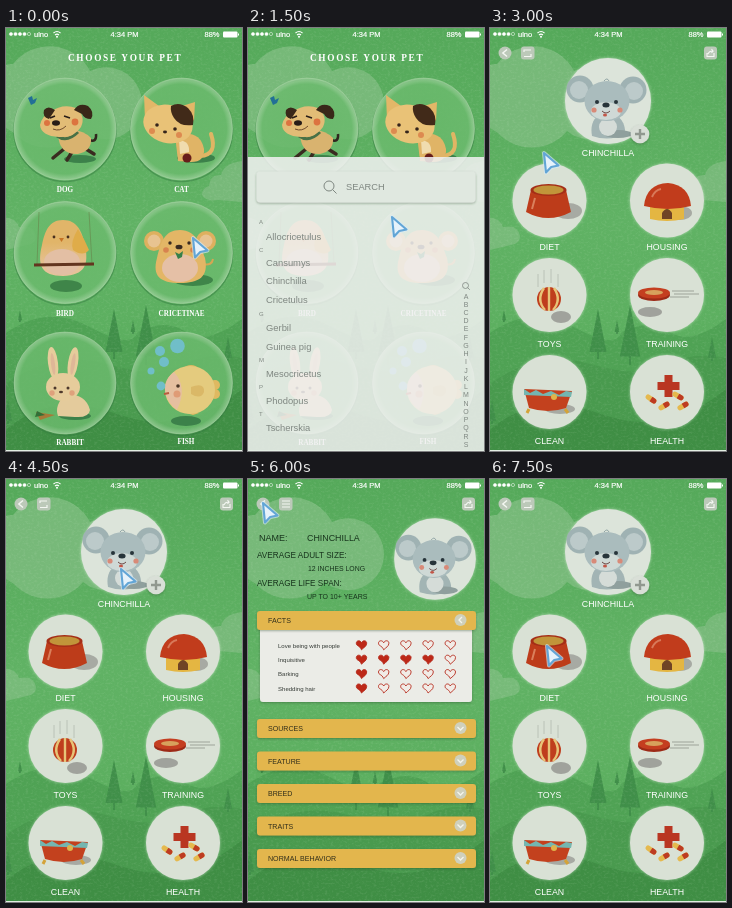
An HTML page that plays this animation: 236 by 423 pixels, repeating every 8 s.

```html
<!DOCTYPE html>
<html lang="en">
<head>
<meta charset="utf-8">
<title>Choose your pet</title>
<style>
  html, body { margin: 0; width: 100%; height: 100%; overflow: hidden; background: #56a95c; }
  svg { display: block; width: 236px; height: 423px; font-family: "Liberation Sans", Arial, sans-serif; }
  .slab { font: bold 9.3px "Liberation Serif", serif; letter-spacing: 1.65px; }
  .tag { font: bold 7.2px "Liberation Serif", serif; }
  .mid { text-anchor: middle; }
  .w { fill: #fff; }
</style>
</head>
<body>
<svg viewBox="0 0 236 423" xmlns="http://www.w3.org/2000/svg">
<defs>
  <linearGradient id="sky" x2="0" y2="1">
    <stop offset="0" stop-color="#55a95a"/><stop offset=".45" stop-color="#60b264"/><stop offset="1" stop-color="#58ac5b"/>
  </linearGradient>
  <radialGradient id="glass">
    <stop offset="0" stop-color="#68b86a" stop-opacity=".88"/><stop offset=".88" stop-color="#6bba6d" stop-opacity=".85"/>
    <stop offset="1" stop-color="#9bcf9a" stop-opacity=".85"/>
  </radialGradient>
  <linearGradient id="egg" x2="0" y2="1">
    <stop offset=".4" stop-color="#e1b569"/><stop offset=".85" stop-color="#e6c299"/>
  </linearGradient>
  <filter id="grain" x="0" y="0" width="100%" height="100%">
    <feTurbulence type="fractalNoise" baseFrequency=".35 .5" numOctaves="2" seed="4"/>
    <feColorMatrix values="0 0 0 0 .95  0 0 0 0 1  0 0 0 0 .9  3 0 0 0 -1.4"/>
  </filter>
  <filter id="shade" x="-20%" y="-20%" width="140%" height="150%">
    <feDropShadow dx="0" dy="1" stdDeviation="1" flood-color="#23452a" flood-opacity=".4"/>
  </filter>
  <filter id="halo" x="-20%" y="-20%" width="140%" height="140%">
    <feDropShadow dx="0" dy="0" stdDeviation="1.5" flood-color="#e4f3e2" flood-opacity=".6"/>
  </filter>
  <path id="heart" d="M0 4.8C-2-.1-5.2 1.4-5.2-1.8C-5.2-4.7-1.3-5.2 0-2.2C1.3-5.2 5.2-4.7 5.2-1.8C5.2 1.4 2 2.6 0 4.8Z" stroke="#b62c1d" stroke-width=".9"/>
  <path id="arrow" d="M1 1L3 20.5L8.2 15L15.5 13.5Z" stroke-linejoin="round"/>
  <g id="mouse">
    <circle r="43" fill="#dce4da" filter="url(#halo)"/>
    <path d="M-16 35C-19 18-9 12 0 12S18 20 17 33Q2 41-16 35Z" fill="#a2b4b4"/>
    <ellipse cx="10" cy="33" rx="14" ry="4" fill="#8f9f9d"/>
    <ellipse cx="0" cy="26" rx="9" ry="9" fill="#d5dcd8"/>
    <g fill="#9fb2b3"><circle cx="-28" cy="-12" r="13.5"/><circle cx="25" cy="-11" r="13.5"/></g>
    <g fill="#bccaca"><circle cx="-29" cy="-11" r="9"/><circle cx="26" cy="-10" r="9"/></g>
    <ellipse cx="-1" cy="0" rx="22.5" ry="20" fill="#aabcbd"/>
    <ellipse cx="-2" cy="10" rx="15" ry="9" fill="#cfd9d6"/>
    <path d="M-4-20Q-1-24 1-20" stroke="#8fa3a4" fill="none"/>
    <g fill="#27343a"><circle cx="-11" cy="1" r="2"/><circle cx="8" cy="1" r="2"/><ellipse cx="-2" cy="4" rx="3.6" ry="2.5"/></g>
    <path d="M-6 10Q-2 14 2 10" fill="none" stroke="#6d4b48"/>
    <g fill="#d88a78"><circle cx="-14" cy="9" r="2.6"/><circle cx="12" cy="9" r="2.6"/></g>
    <ellipse cx="-3" cy="14" rx="2" ry="1.5" fill="#c25648"/>
  </g>
</defs>

<g id="land">
  <rect width="236" height="423" fill="url(#sky)"/>
  <g fill="#7fbd80">
    <path d="M0 37A32 32 0 0 1 7 36A46 46 0 0 1 84 43A36 36 0 1 1 77 103A46 46 0 0 1 8 105L0 100Z" opacity=".8"/>
    <path d="M0 190Q10 190 13 199Q28 196 30 208Q30 216 21 217L0 222Z" opacity=".75"/>
    <path d="M236 133Q218 135 215 147Q204 146 203 158Q196 160 196 167Q200 174 212 172L236 174Z" opacity=".75"/>
  </g>
  <path d="M0 305Q42 276 84 299T132 304Q160 290 180 304T236 291V423H0Z" fill="#4fa254"/>
  <path d="M0 356Q48 321 100 336T177 337T236 330V423H0Z" fill="#499a4e"/>
  <path d="M0 402Q45 362 111 386T236 361V423H0Z" fill="#3f8e44"/>
  <g id="trees" fill="#408f49"></g>
  <rect width="236" height="423" filter="url(#grain)" opacity=".08"/>
</g>

<g id="choose">
  <text class="slab w" x="62" y="33">CHOOSE YOUR PET</text>
  <g id="discs"></g>
  <g id="dog">
    <ellipse cx="74" cy="131" rx="16" ry="4" fill="#3c814a"/>
    <path d="M22 70l4-2 1 4 4-2-2 5-4 2z" fill="#226f96"/>
    <path d="M83 112Q91 115 90 106" fill="none" stroke="#30261e" stroke-width="2.5"/>
    <path d="M58 121L47 130M66 124L61 132M80 121L88 126" stroke="#3a2b20" stroke-width="3.5" stroke-linecap="round"/>
    <path d="M52 106Q72 97 85 110Q86 123 72 126Q53 127 52 106Z" fill="#d9b36f"/>
    <path d="M51 108Q61 115 72 104" fill="none" stroke="#487146" stroke-width="3"/>
    <path d="M44 84Q57 75 70 80Q80 88 75 99Q68 110 53 109Q35 108 34 97Q36 88 44 84Z" fill="#e2bc76"/>
    <path d="M49 82Q42 77 38 82Q36 89 43 91ZM68 82Q73 74 82 78Q89 84 85 91Q78 91 76 86Z" fill="#392819"/>
    <path d="M44 90l5-2M58 88l6 2" stroke="#271c17" stroke-width="1.6"/>
    <ellipse cx="50" cy="95" rx="4" ry="2.8" fill="#271c17"/>
    <g fill="#dc7340"><circle cx="41" cy="95" r="3"/><circle cx="69" cy="94" r="3.4"/></g>
    <path d="M47 101Q54 104 60 98" fill="none" stroke="#6f4b2d"/>
  </g>
  <g id="cat">
    <ellipse cx="190" cy="130" rx="19" ry="5" fill="#3c814a"/>
    <path d="M194 128Q212 127 205 106" fill="none" stroke="#e0b564" stroke-width="4" stroke-linecap="round"/>
    <path d="M169 107Q194 101 198 121Q199 135 183 134L172 133Z" fill="#e0b466"/>
    <path d="M173 112Q184 113 183 124L174 126Z" fill="#f0dcae"/>
    <path d="M138 67L153 78L139 92ZM176 78L189 74L188 93Z" fill="#e3b768"/>
    <ellipse cx="162" cy="96" rx="25" ry="19" transform="rotate(14 162 96)" fill="#e9c277"/>
    <path d="M165 78Q173 73 182 80Q189 87 187 97Q174 99 168 90Q164 84 165 78Z" fill="#412a19"/>
    <g fill="#35241b"><circle cx="151" cy="97" r="1.8"/><circle cx="169" cy="101" r="1.8"/><ellipse cx="159" cy="104" rx="2" ry="1.4"/></g>
    <g fill="#dd8a50"><circle cx="146" cy="103" r="3"/><circle cx="173" cy="107" r="3"/></g>
    <circle cx="181" cy="130" r="4.5" fill="#671d1a"/>
  </g>
  <g id="bird">
    <ellipse cx="60" cy="258" rx="16" ry="6" fill="#3f8549"/>
    <path d="M33 184L31 236M83 184L86 236" stroke="#688b50" stroke-width=".7"/>
    <path d="M57 192C71 192 76 203 79 217C83 237 79 247 57 248C35 248 31 237 36 217C39 203 43 192 57 192Z" fill="url(#egg)"/>
    <ellipse cx="56" cy="234" rx="18" ry="13" fill="#e3bfa4"/>
    <path d="M72 201Q79 212 83 222Q77 229 67 222Q64 214 72 201Z" fill="#dfac49"/>
    <g fill="#49301e"><circle cx="48" cy="209" r="1.4"/><circle cx="62" cy="209" r="1.4"/></g>
    <path d="M53 210h5l-2.5 4z" fill="#c77325"/>
    <path d="M28 237L88 236" stroke="#63351f" stroke-width="3"/>
  </g>
  <g id="hamster">
    <ellipse cx="187" cy="252" rx="20" ry="6" fill="#3f8549"/>
    <path d="M197 236q9 2 10-5" fill="none" stroke="#d5a653" stroke-width="2"/>
    <g fill="#deb05f"><circle cx="148" cy="213" r="10"/><circle cx="200" cy="213" r="10"/></g>
    <g fill="#e8c391"><circle cx="148" cy="213" r="6.5"/><circle cx="200" cy="213" r="6.5"/></g>
    <path d="M174 202C190 202 194 216 199 230C203 249 193 255 174 255C154 255 146 248 151 230C155 213 159 202 174 202Z" fill="#e3b666"/>
    <ellipse cx="174" cy="240" rx="18" ry="14" fill="#e5c0a6"/>
    <g fill="#392a20"><circle cx="164" cy="215" r="1.7"/><circle cx="183" cy="215" r="1.7"/><ellipse cx="173" cy="219" rx="3.5" ry="2.3"/></g>
    <g fill="#d7834f"><circle cx="160" cy="222" r="2.8"/><circle cx="187" cy="222" r="2.8"/></g>
    <path d="M169 224l4 2 4-3-1 6-4 2z" fill="#35804a"/>
  </g>
  <g id="rabbit">
    <ellipse cx="69" cy="388" rx="16" ry="4" fill="#3c814a"/>
    <path d="M30 384L49 387L34 392Z" fill="#a77938"/><path d="M31 383l8 4-10 2z" fill="#326f37"/>
    <path d="M60 366Q80 366 84 382Q83 390 69 389L52 388Q48 377 60 366Z" fill="#e4cb9c"/>
    <g fill="#e6cc9b"><ellipse cx="47" cy="335" rx="5" ry="16" transform="rotate(-7 47 335)"/><ellipse cx="67" cy="335" rx="5" ry="16" transform="rotate(9 67 335)"/><ellipse cx="57" cy="359" rx="17" ry="14"/></g>
    <g fill="#dfb797"><ellipse cx="47" cy="336" rx="2" ry="11" transform="rotate(-7 47 336)"/><ellipse cx="67" cy="336" rx="2" ry="11" transform="rotate(9 67 336)"/></g>
    <g fill="#4e392c"><circle cx="49" cy="360" r="1.5"/><circle cx="62" cy="360" r="1.5"/><ellipse cx="55" cy="364" rx="2" ry="1.2"/></g>
    <g fill="#dfa17c"><circle cx="46" cy="365" r="2.7"/><circle cx="66" cy="365" r="2.7"/></g>
  </g>
  <g id="fish">
    <ellipse cx="180" cy="393" rx="15" ry="5" fill="#3c814a"/>
    <g fill="#dfb961"><circle cx="209" cy="357" r="5"/><circle cx="209" cy="366" r="5"/><path d="M176 341Q185 333 194 341L190 350ZM177 384l6-4 10 5-6 2z"/></g>
    <ellipse cx="184" cy="362" rx="25" ry="24" fill="#e4cb7e"/>
    <path d="M168 344Q182 359 171 382Q158 372 159 357Q161 349 168 344Z" fill="#e5bfa0"/>
    <path d="M185 359Q199 354 198 364Q195 372 185 366Z" fill="#dab867"/>
    <circle cx="172" cy="358" r="1.8" fill="#4b3525"/><circle cx="171" cy="366" r="3.5" fill="#df9b76"/>
    <path d="M158 366l5-1" stroke="#b95c3f" stroke-width="2"/>
    <g fill="#72bfd3" opacity=".9"><circle cx="171.5" cy="318" r="7.3"/><circle cx="154" cy="323" r="5"/><circle cx="158" cy="334" r="5"/><circle cx="145" cy="343" r="3.5"/><circle cx="155" cy="358" r="4.4"/></g>
  </g>
</g>

<g id="home">
  <use href="#mouse" x="118" y="73"/>
  <circle cx="150" cy="106" r="9.3" fill="#d9dfd7" filter="url(#shade)"/>
  <path d="M145 106h10M150 101v10" stroke="#91988f" stroke-width="2.4"/>
  <text class="mid w" x="118" y="128" font-size="8.8">CHINCHILLA</text>
  <g id="plates"></g>
  <ellipse cx="78" cy="183" rx="14" ry="8" fill="#a7aaa3"/>
  <path d="M41 162L36 184Q58 196 81 184L76 162Z" fill="#bd3c1a"/>
  <ellipse cx="58.5" cy="162" rx="18" ry="6" fill="#a52e17"/><ellipse cx="58.5" cy="162" rx="15" ry="4.5" fill="#c1953a"/>
  <path d="M45 170L42 181" stroke="#da805c" stroke-width="2"/>
  <ellipse cx="190" cy="185" rx="12" ry="7" fill="#a7aaa3"/>
  <path d="M160 175h34v16q-17 4-34 0z" fill="#e4b642"/><path d="M172 191v-6q5-8 10 0v6z" fill="#704425"/>
  <path d="M154 178Q156 156 178 155Q199 157 201 178Q178 184 154 178Z" fill="#c13c1c"/>
  <path d="M162 169Q165 162 171 161" fill="none" stroke="#d8795a" stroke-width="2"/>
  <ellipse cx="71" cy="289" rx="10" ry="6" fill="#a0a29c"/>
  <path d="M48 246v13M54 242v13M61 241v14M68 246v13" stroke="#b3bab0" stroke-width=".8"/>
  <circle cx="59" cy="271" r="12" fill="#bf3e1d"/>
  <path d="M54 260Q46 272 55 282M64 260Q72 272 63 282M59 259v24" fill="none" stroke="#e7c478" stroke-width="2.4"/>
  <ellipse cx="160" cy="284" rx="12" ry="5" fill="#a0a29c"/>
  <path d="M182 263h22M184 266h25M180 269h19" stroke="#838780" stroke-width=".7"/>
  <ellipse cx="164" cy="267" rx="16" ry="6" fill="#9c2a17"/><ellipse cx="164" cy="265" rx="16" ry="5.5" fill="#c43e20"/><ellipse cx="164" cy="264.5" rx="9" ry="2.6" fill="#d7a15c"/>
  <ellipse cx="70" cy="381" rx="15" ry="5" fill="#a7aaa3"/>
  <path d="M34 361L82 363L76 380Q58 386 39 380Z" fill="#c3411e"/><path d="M34 361l6 4 6-3 7 4 8-3 8 4 7-4 6 1-1 5-47-2z" fill="#74b6b0"/>
  <path d="M39 381l-2 4M75 381l3 4" stroke="#d4a338" stroke-width="3"/><circle cx="64" cy="369" r="3" fill="#e0b34a"/>
  <path d="M174.5 347h8v7h7v8h-7v7h-8v-7h-7v-8h7z" fill="#b93622"/>
  <g id="pills"></g>
</g>

<g id="facts">
  <g fill="#18351d">
    <text x="11" y="62" font-size="9">NAME:</text><text x="59" y="62" font-size="8.9">CHINCHILLA</text>
    <text x="9" y="79" font-size="8.2">AVERAGE ADULT SIZE:</text><text x="60" y="92" font-size="6.9">12 INCHES LONG</text>
    <text x="9" y="107" font-size="8.2">AVERAGE LIFE SPAN:</text><text x="59" y="120" font-size="7">UP TO 10+ YEARS</text>
  </g>
  <use href="#mouse" transform="translate(187 80) scale(.95)"/>
  <rect x="12" y="148" width="212" height="75" rx="3" fill="#ebece7" filter="url(#shade)"/>
  <g id="bars"></g><g id="traits"></g>
</g>

<g id="nav">
  <circle cx="15" cy="25" r="6.5" fill="#bcc9b9"/><path d="M17 21.5L12.8 25L17 28.5" fill="none" stroke="#f4f7f2" stroke-width="1.4"/>
  <rect x="31" y="18.5" width="13.5" height="13" rx="3" fill="#bcc9b9"/>
  <path id="swap" d="M34 24v-2h7M41 26v2.5h-7" fill="none" stroke="#f4f7f2" stroke-width="1.2"/>
  <path id="lines" d="M34 22h8M34 25h8M34 28h8" stroke="#f4f7f2" stroke-width="1.2"/>
  <rect x="214" y="18.5" width="13" height="13" rx="3" fill="#bcc9b9"/>
  <path d="M217 25v3.5h7V25M218 26q1-3 5-3l-1.5-2M223 23l-1.5 2" fill="none" stroke="#f4f7f2" stroke-width="1.1"/>
</g>

<g id="status" class="w" font-size="7.5">
  <g id="dots"></g>
  <g stroke="#fff" stroke-width=".2">
    <text x="28" y="9">ulno</text><text class="mid" x="118.5" y="9">4:34 PM</text><text x="198.5" y="9">88%</text>
  </g>
  <path d="M47.5 5Q51 2 54.5 5M49 7Q51 5.2 53 7" fill="none" stroke="#fff" stroke-width="1.1"/><circle cx="51" cy="8.7" r="1"/>
  <rect x="217" y="3.5" width="14.5" height="6" rx="1"/><path d="M232 5.5h1v2h-1z"/>
</g>

<g id="sheet">
  <rect width="236" height="423" fill="#f0f1f0" opacity=".87"/>
  <rect x="8.5" y="14.5" width="219" height="31" rx="4" fill="#e0e8e0" filter="url(#shade)"/>
  <g fill="none" stroke="#7f8781"><circle cx="81" cy="29" r="5"/><path d="M84.6 32.6L88.5 36.5"/></g>
  <text x="98" y="33.3" font-size="9.3" fill="#7f8781">SEARCH</text>
  <g id="list" fill="#7f8781"></g>
</g>
<rect y="422" width="236" height="1" fill="#e3eee3"/>
<g id="cursor">
  <use href="#arrow" fill="none" stroke="#d8ebf6" stroke-width="4" opacity=".65"/>
  <use href="#arrow" fill="#e6f2fb" stroke="#62a5d6" stroke-width="2.1"/>
</g>
</svg>

<script>
const $ = id => document.getElementById(id);
const put = (id, html) => $(id).insertAdjacentHTML('beforeend', html);
const label = (x, y, s, size, extra = '') => `<text x="${x}" y="${y}" font-size="${size}" ${extra}>${s}</text>`;

// Each tree: x, top, height
for (const [x, y, h] of [[108, 281, 50], [140, 277, 60], [222, 309, 24], [14, 282, 12], [2, 372, 24], [127, 292, 14]])
  put('trees', `<path d="M${x} ${y}L${x + h * .17} ${y + h * .86}H${x + 1}V${y + h}H${x - 1}V${y + h * .86}H${x - h * .17}Z"/>`);

['DOG', 'CAT', 'BIRD', 'CRICETINAE', 'RABBIT', 'FISH'].forEach((s, i) => {
  const x = i % 2 ? 175.5 : 59, y = [101, 224.5, 355][i >> 1];
  put('discs', `<circle cx="${x}" cy="${y + 1.5}" r="51" fill="none" stroke="#347d40" stroke-width="1.5" opacity=".5"/>
    <circle cx="${x}" cy="${y}" r="51" fill="url(#glass)" stroke="#a9d6a6" stroke-opacity=".5"/>
    <text class="tag mid w" x="${i === 5 ? 180 : i === 4 ? 64 : x}" y="${[163.5, 287.5, 416.5][i >> 1] - (i === 5)}">${s}</text>`);
});

['DIET', 'HOUSING', 'TOYS', 'TRAINING', 'CLEAN', 'HEALTH'].forEach((s, i) => {
  const x = i % 2 ? 177 : 59.5, y = [172.5, 267, 364][i >> 1];
  put('plates', `<circle cx="${x}" cy="${y}" r="37" fill="#d9e1d5" filter="url(#halo)"/>` +
    label(x, [221.5, 319, 416][i >> 1], s, 8.8, 'class="mid w"'));
});

for (const [x, y, a] of [[161, 371, 35], [174, 378, -30], [188, 368, 30], [193, 378, -30]])
  put('pills', `<g transform="translate(${x} ${y}) rotate(${a})"><rect x="-6" y="-2.6" width="12" height="5.2" rx="2.6" fill="#e5b94e"/><path d="M0-2.6h3.4a2.6 2.6 0 0 1 0 5.2H0z" fill="#bd3b22"/></g>`);

['FACTS', 'SOURCES', 'FEATURE', 'BREED', 'TRAITS', 'NORMAL BEHAVIOR'].forEach((s, i) => {
  const y = i ? 207.5 + 32.5 * i : 132;
  put('bars', `<rect x="9" y="${y}" width="219" height="19" rx="3" fill="#e3b64d" filter="url(#shade)"/>
    <circle cx="212.5" cy="${y + 9}" r="6" fill="#cfd0bc"/>
    <path d="${i ? `M209.5 ${y + 8}l3 3 3-3` : 'M214 138l-3 3 3 3'}" fill="none" stroke="#f5f5ec" stroke-width="1.3"/>` +
    label(20, y + 12.3, s, 7.1, 'fill="#33301c"'));
});

[['Love being with people', 1], ['Inquisitive', 4], ['Barking', 1], ['Shedding hair', 1]].forEach(([s, n], i) => {
  const y = 166 + 14.4 * i;
  put('traits', label(30, y + 2.5, s, 6.05, 'fill="#353b36"'));
  for (let k = 0; k < 5; k++)
    put('traits', `<use href="#heart" x="${113.5 + 22.2 * k}" y="${y}" fill="${k < n ? '#bd2818' : '#f1ece7'}"/>`);
});

for (let i = 0; i < 5; i++)
  put('dots', `<circle cx="${5 + 4.5 * i}" cy="6" r="1.6" stroke="#fff" stroke-width=".5" fill="${i < 4 ? '#fff' : 'none'}"/>`);

for (const [s, y] of [['Allocricetulus', 80], ['Cansumys', 105.5], ['Chinchilla', 124], ['Cricetulus', 143], ['Gerbil', 170.5],
  ['Guinea pig', 189.5], ['Mesocricetus', 216.5], ['Phodopus', 244], ['Tscherskia', 271]])
  put('list', label(18, y + 3.2, s, 9.4));
for (const [s, y] of [['A', 67], ['C', 95], ['G', 159], ['M', 205], ['P', 232], ['T', 259]])
  put('list', label(11, y, s, 6));
put('list', '<g fill="none" stroke="#7f8781" stroke-width=".8"><circle cx="217.5" cy="128.5" r="3"/><path d="M219.6 130.6l2.2 2.2"/></g>');
for (let i = 0; i < 26; i++)
  put('list', label(218, 141.5 + 8.24 * i, String.fromCharCode(65 + i), 7, 'class="mid"'));

// Start time, screen, cursor x, cursor y, sheet top
const steps = [
  [0, 'choose', 186, 209], [500, 'choose', 177, 224], [1000, 'choose', 175, 224],
  [1500, 'choose', 143, 188, 129], [2000, 'choose', 82, 152, 0], [2500, 'choose', 53, 124, 0],
  [3000, 'home', 53, 124], [4000, 'home', 110, 98], [4500, 'home', 114, 89],
  [5000, 'facts', 36, 43], [5500, 'facts', 13, 23], [6000, 'facts', 14, 23],
  [6500, 'home', 13, 25], [7000, 'home', 28, 60], [7500, 'home', 56, 166]
];
const show = (id, on) => { $(id).style.display = on ? '' : 'none'; };
let last;

function draw() {
  const t = performance.now() % 8000;
  const step = steps.findLast(s => s[0] <= t);
  if (step !== last) {
    const [, screen, x, y, top] = last = step;
    for (const id of ['choose', 'home', 'facts']) show(id, id === screen);
    show('nav', screen !== 'choose');
    show('swap', screen === 'home');
    show('lines', screen === 'facts');
    show('sheet', top !== undefined);
    $('sheet').setAttribute('transform', `translate(0 ${top || 0})`);
    $('cursor').setAttribute('transform', `translate(${x} ${y})`);
  }
  requestAnimationFrame(draw);
}
draw();
</script>
</body>
</html>
```
